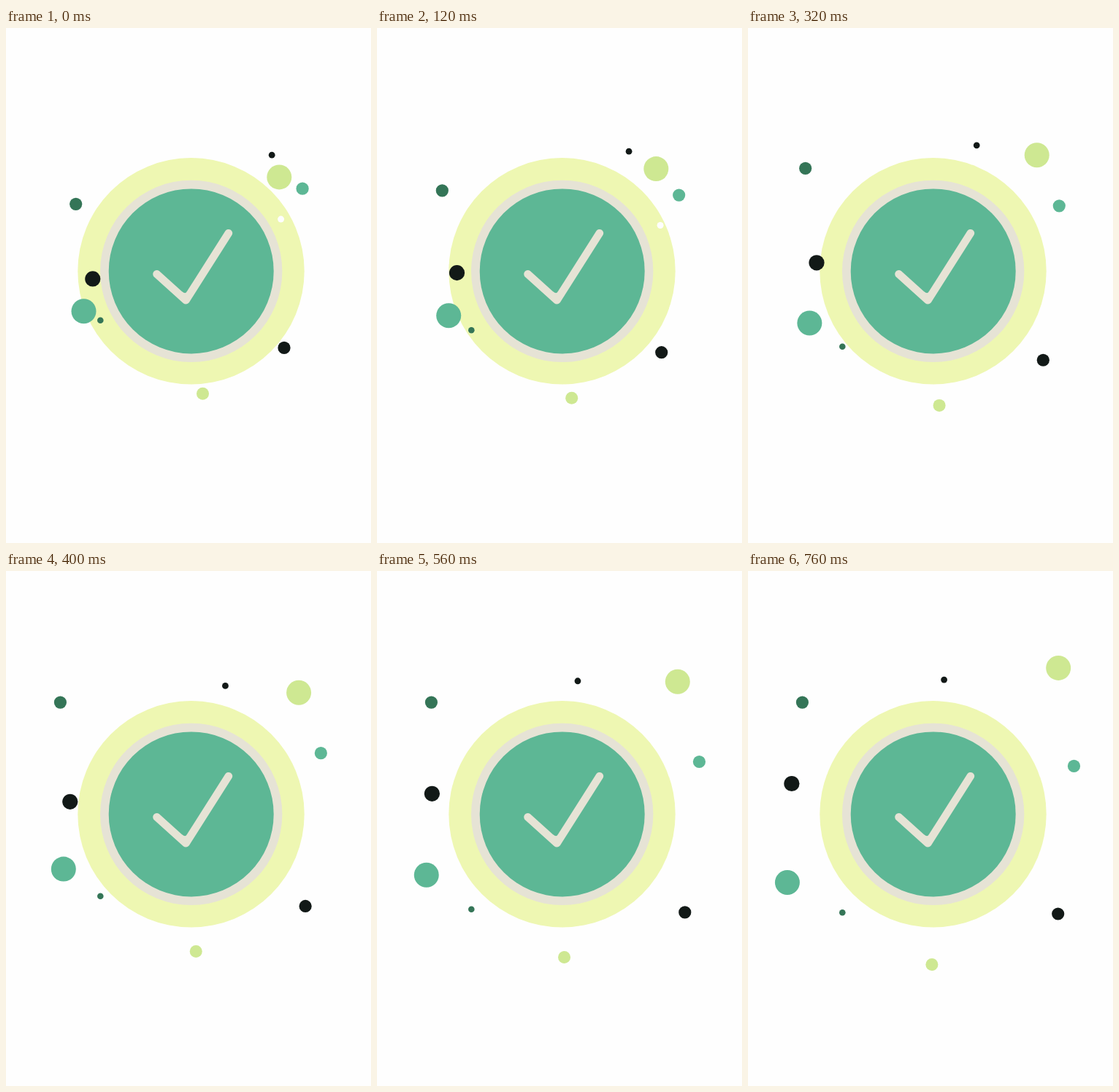
These frames come from a looping animation (500 by 706 pixels, 800 ms). An HTML page:

```html
<!DOCTYPE html>
<html lang="en">
<head>
<meta charset="utf-8">
<title>Success badge</title>
<style>
  html, body { margin: 0; width: 100%; height: 100%; overflow: hidden; background: #fefefe; }
  svg { display: block; width: 100vw; height: 100vh; }
</style>
</head>
<body>
<svg viewBox="0 0 500 706">
  <circle cx="253.5" cy="333.3" r="155.2" fill="#eef7b2"/>
  <circle cx="253.7" cy="333.4" r="124.7" fill="#e6e3d5"/>
  <circle cx="253.7" cy="333.4" r="113" fill="#5db795"/>
  <path d="M206.5 337.2L246.4 373.3L304.9 281.2" fill="none" stroke="#e6e3d5"
    stroke-width="10.6" stroke-linecap="round" stroke-linejoin="round"/>
  <path d="M241 361.2Q245.6 365.3 248.2 361.2L246.4 371Z" fill="#e6e3d5"/>
  <g id="dots"></g>
</svg>
<script>
const LOOP = 800, STEP = 40;
const BLACK = '#121917', TEAL = '#5db795', LIME = '#cee892', PINE = '#347557', WHITE = '#fefefe';

// colour, radius, start x, y, end x, y, travel time in ms
const dots = [
  [BLACK, 4.4, 364.2, 174.2, 268.6, 149.1, 600],
  [LIME, 17, 374.3, 204.4, 425.2, 132.9, 760],
  [TEAL, 8.6, 406.1, 220.2, 446.5, 267.4, 640],
  [WHITE, 4.5, 376.6, 262.1, 449.5, 315, 760],
  [PINE, 8.6, 95.7, 241.3, 74.4, 180.1, 400],
  [BLACK, 10.6, 118.8, 343.9, 59.9, 291.5, 760],
  [TEAL, 17, 106.5, 388.2, 53.9, 427, 760],
  [PINE, 4.3, 129.3, 400.7, 129.3, 468.3, 600],
  [BLACK, 8.6, 381, 438.4, 424.7, 470, 600],
  [LIME, 8.5, 269.5, 501.3, 251.9, 539.5, 760]
].map(([fill, r, x0, y0, x1, y1, span]) => {
  const el = document.createElementNS('http://www.w3.org/2000/svg', 'circle');
  el.setAttribute('fill', fill);
  el.setAttribute('r', r);
  document.getElementById('dots').append(el);
  return { el, x0, y0, x1, y1, span };
});

function draw(time) {
  const t = Math.floor((time % LOOP) / STEP) * STEP;
  for (const { el, x0, y0, x1, y1, span } of dots) {
    const p = Math.min(1, t / span);
    el.setAttribute('cx', x0 + (x1 - x0) * p);
    el.setAttribute('cy', y0 + (y1 - y0) * p);
  }
}

function tick() {
  draw(performance.now());
  requestAnimationFrame(tick);
}
tick();
</script>
</body>
</html>
```
